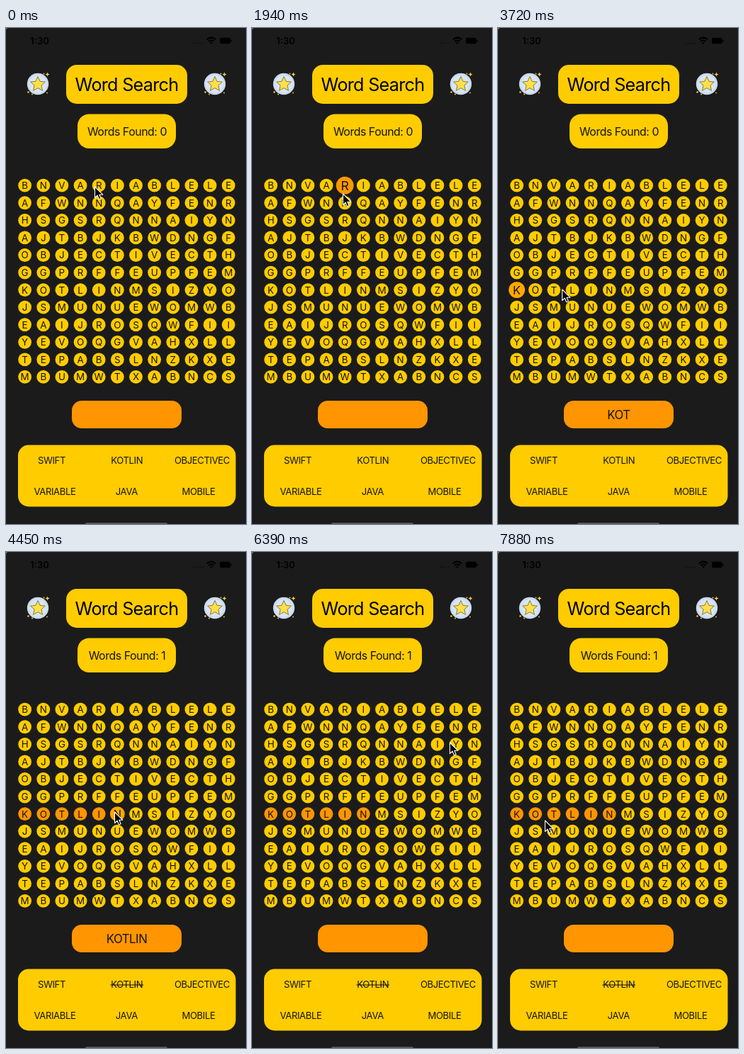
Animation of 339x700 px, one loop 8 s. Source, as an HTML page:

```html
<!DOCTYPE html>
<html lang="en">
<head>
<meta charset="utf-8">
<title>Word Search</title>
<style>
html, body { margin: 0; width: 100%; height: 100%; overflow: hidden; background: #1b1b1b; }
svg { display: block; width: 100%; height: 100%; }
text { font-family: Inter, "Liberation Sans", sans-serif; letter-spacing: -.029em; text-anchor: middle; fill: #17140a; }
.gold { fill: #fc0; }
.title { font-size: 25.2px; fill: #000; }
.score { font-size: 15.9px; }
.pick { font-size: 16.8px; }
.list text { font-size: 13.1px; }
.cell text { font-size: 13.4px; letter-spacing: 0; }
.clock { font-size: 13px; font-weight: 600; letter-spacing: 0; fill: #000; }
</style>
</head>
<body>
<svg viewBox="0 0 339 700">
  <defs>
    <g id="badge">
      <circle r="15.2" fill="#c9daef"/>
      <circle r="12.6" fill="#d8e5f5"/>
      <path d="M0-10.5 3.1-3.6 10.4-2.9 4.9 2.1 6.5 9.4 0 5.6-6.5 9.4-4.9 2.1-10.4-2.9-3.1-3.6Z"
        fill="#ffe04a" stroke="#8c7a35" stroke-linejoin="round"/>
      <g fill="#f5c83c">
        <path d="M13.5-16.5l.9 2.1 2.1.9-2.1.9-.9 2.1-.9-2.1-2.1-.9 2.1-.9Z"/>
        <circle cx="8.5" cy="-14.5" r=".9"/>
        <circle cx="-13.5" cy="11.5" r="1.3"/>
        <circle cx="-8" cy="14.5" r="1"/>
        <circle cx="13" cy="12.5" r=".9"/>
      </g>
    </g>
  </defs>
  <rect width="339" height="700" fill="#1b1b1b"/>
  <path d="M0 0H4Q0 0 0 4Z" fill="#777"/>

  <text class="clock" x="47.5" y="22.6">1:30</text>
  <path d="M265 21.5H279" stroke="#0c0c0c" stroke-width="1.5" stroke-dasharray="2 2"/>
  <g fill="none" stroke="#000" stroke-width="2.2">
    <path d="M284 16.3Q290 10.7 296 16.3M286.3 19Q290 15.6 293.7 19"/>
    <path d="M288.3 20.6H291.7L290 22.6Z" fill="#000" stroke-width=".6"/>
  </g>
  <rect x="302" y="13.7" width="15" height="8.6" rx="2.4"/>
  <rect x="317.7" y="16.5" width="1.3" height="3" rx=".6"/>

  <use href="#badge" x="45" y="79"/>
  <use href="#badge" x="295" y="79"/>

  <rect class="gold" x="85" y="52" width="171" height="55" rx="15"/>
  <text class="title" x="170.5" y="89">Word Search</text>
  <rect class="gold" x="101" y="121.5" width="139" height="48.5" rx="16.5"/>
  <text class="score" id="score" x="171" y="151.6">Words Found: 0</text>

  <g id="grid"></g>

  <rect x="93" y="526" width="155" height="39" rx="14" fill="#ff9500"/>
  <text class="pick" id="pick" x="170.5" y="551.7"></text>

  <rect class="gold" x="17" y="588.5" width="307.5" height="87" rx="15"/>
  <g class="list">
    <text x="64.5" y="615.3">SWIFT</text>
    <text x="170.7" y="615.3">KOTLIN</text>
    <text x="277" y="615.3">OBJECTIVEC</text>
    <text x="69" y="659">VARIABLE</text>
    <text x="170.3" y="659">JAVA</text>
    <text x="272" y="659">MOBILE</text>
    <path id="strike" d="M147.5 611H194" stroke="#17140a" stroke-width="1.1"/>
  </g>
  <rect x="112" y="698.3" width="116" height="4" rx="2" fill="#5c5c5c"/>

  <path id="cursor" d="M0 0V15.5L3.6 12.2 6 17.8 8.7 16.7 6.3 11.2H11.2Z"
    fill="#000" stroke="#fff" stroke-width="1.1" stroke-linejoin="round"/>
</svg>
<script>
// All times below are counted in screen refreshes.
const LOOP = 8000, REFRESH = 148.6;
const ROWS = ["BNVARIABLELE", "AFWNNQAYFENR", "HSGSRQNNAIYN", "AJTBJKBWDNGF",
  "OBJECTIVECTH", "GGPRFFEUPFEM", "KOTLINMSIZYO", "JSMUNUEWOMWB",
  "EAIJROSQWFII", "YEVOQGVAHXLL", "TEPABSLNZKXE", "MBUMWTXABNCS"];

// Pointer stops: [time, x, y]
const STOPS = [[0, 125.5, 224], [10, 128.5, 234], [13, 128.5, 234], [20, 56.5, 378], [22, 28, 371],
  [28, 153.5, 367], [33, 153.5, 367], [38, 316, 158], [39, 314, 232], [43, 279.5, 269],
  [47, 48, 262], [51, 82, 426], [53, 66.5, 379]];

const TAP = { row: 0, col: 4, on: 7, off: 12.7 };
const WORD = { row: 6, text: "KOTLIN", start: 23, gap: 0.8, found: 27, clear: 33 };

const $ = id => document.getElementById(id);
const mix = (a, b, k) => a + (b - a) * k;
const ease = (t, start, span) => {
  const k = Math.min(1, Math.max(0, (t - start) / span));
  return k * k * (3 - 2 * k);
};
const grow = (t, start) => ease(t, start + 0.8, 2);

function svg(tag, attrs, parent) {
  const el = document.createElementNS("http://www.w3.org/2000/svg", tag);
  for (const k in attrs) el.setAttribute(k, attrs[k]);
  return parent.appendChild(el);
}

const cells = ROWS.map((row, j) => [...row].map((ch, i) => {
  const x = 26.6 + 26.15 * i, y = 222.2 + 24.57 * j;
  const g = svg("g", { class: "cell", transform: `translate(${x} ${y})` }, $("grid"));
  const dot = svg("circle", { r: 9.4, fill: "#fc0" }, g);
  svg("text", { y: 4.9 }, g).textContent = ch;
  return { x, y, g, dot };
}));

function setCell({ x, y, g, dot }, size, tint) {
  g.setAttribute("transform", `translate(${x} ${y}) scale(${1 + 0.34 * size})`);
  dot.setAttribute("fill", `rgb(255 ${mix(204, 149, tint)} 0)`);
}

function pointer(t) {
  const i = STOPS.findIndex(s => s[0] >= t);
  const [t1, x1, y1] = STOPS[i], [t0, x0, y0] = STOPS[Math.max(0, i - 1)];
  const k = t1 > t0 ? (t - t0) / (t1 - t0) : 0;
  return [mix(x0, x1, k), mix(y0, y1, k)];
}

function pickedText(t) {
  if (t >= TAP.on && t < TAP.off) return ROWS[TAP.row][TAP.col];
  if (t < WORD.start || t >= WORD.clear) return "";
  return WORD.text.slice(0, 1 + Math.floor((t - WORD.start) / WORD.gap + 1e-6));
}

function draw(t) {
  const tap = grow(t, TAP.on) * (1 - ease(t, TAP.off, 2));
  setCell(cells[TAP.row][TAP.col], tap, tap);
  for (let i = 0; i < WORD.text.length; i++) {
    const tint = grow(t, WORD.start + i * WORD.gap);
    const fall = ease(t, WORD.found + Math.max(0, i - 2) / 2, 1);
    setCell(cells[WORD.row][i], tint * (1 - fall), tint);
  }
  const found = t >= WORD.found;
  $("score").textContent = `Words Found: ${found ? 1 : 0}`;
  $("strike").style.visibility = found ? "visible" : "hidden";
  $("pick").textContent = pickedText(t);
  $("cursor").setAttribute("transform", `translate(${pointer(t)})`);
}

let shown = -1;
function frame() {
  const tick = Math.floor(performance.now() % LOOP / REFRESH);
  if (tick !== shown) draw(shown = tick);
  requestAnimationFrame(frame);
}
frame();
</script>
</body>
</html>
```
